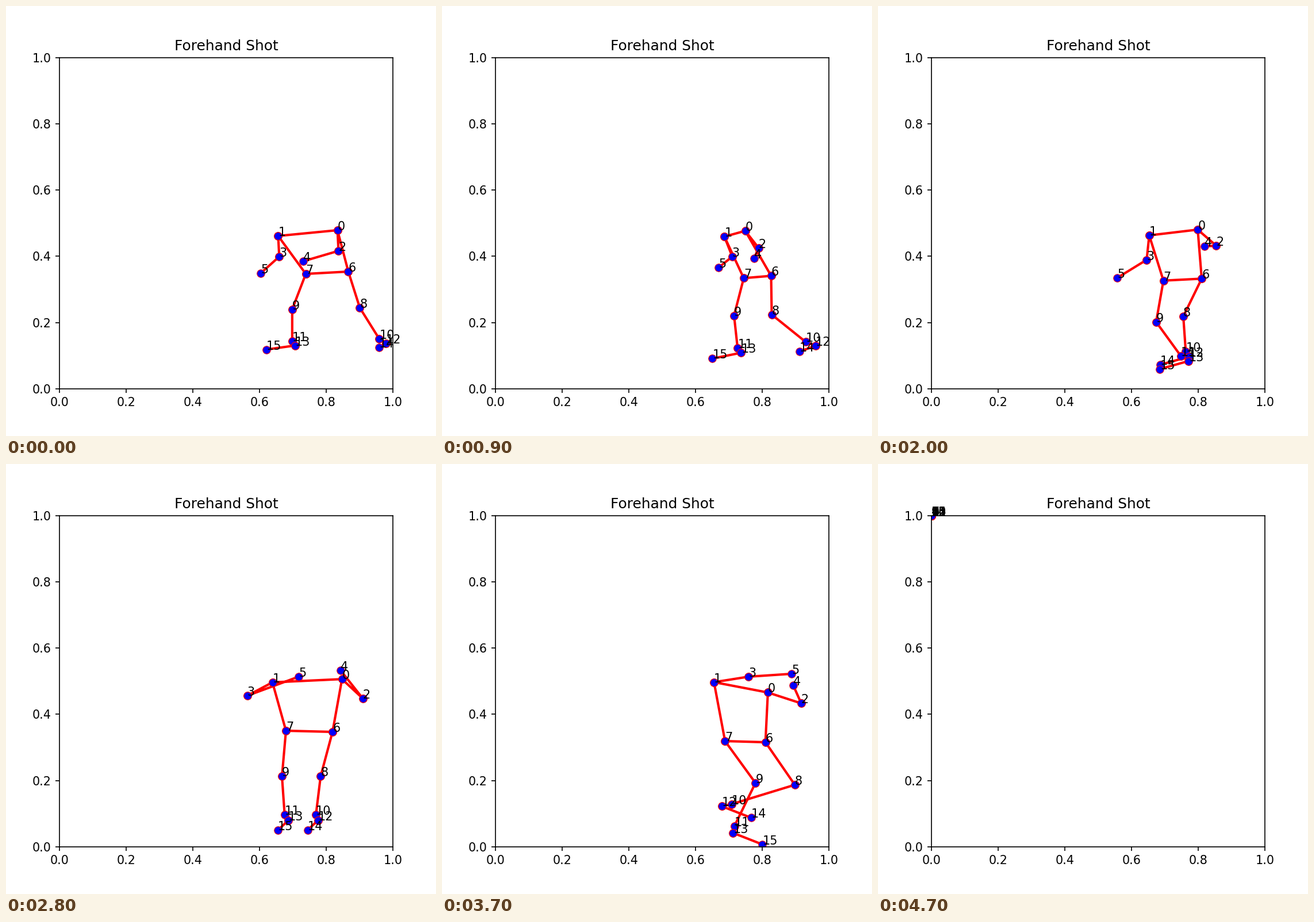
Animation of 748 by 748 pixels, one loop 6.1 s. Source, as a matplotlib script:

```python
import numpy as np
import matplotlib.pyplot as plt
from matplotlib.animation import FuncAnimation

STAGE = 748
STEP_MS = 100
FRAMES = 61
LOST = 47  # from here on the tracker reports every joint at the top left corner

BONES = [(0, 1), (0, 2), (2, 4), (1, 3), (3, 5), (0, 6), (1, 7), (6, 7),
         (6, 8), (8, 10), (10, 12), (12, 14), (7, 9), (9, 11), (11, 13), (13, 15)]
KEY_TIMES = np.array([0, 5, 14, 20, 28, 37, 46])
t = np.arange(LOST)


def curve(*values):
    """Smooth cubic through one value per key time."""
    v = np.array(values)
    slope = np.gradient(v, KEY_TIMES)
    i = np.clip(np.searchsorted(KEY_TIMES, t, side="right") - 1, 0, len(v) - 2)
    span = np.diff(KEY_TIMES)[i]
    u = (t - KEY_TIMES[i]) / span
    return ((1 + 2 * u) * (1 - u) ** 2 * v[i] + u * (1 - u) ** 2 * span * slope[i]
            + u * u * (3 - 2 * u) * v[i + 1] + u * u * (u - 1) * span * slope[i + 1])


def ease(start, end):
    u = np.clip((t - start) / (end - start), 0, 1)
    return u * u * (3 - 2 * u)


def limb(length, degrees):
    """Bone vector, with the angle measured from straight down towards the right."""
    a = np.radians(degrees)
    return length * (np.sin(a) + 1j * np.cos(a))


# The player comes closer to the camera and turns the trunk towards it.
zoom = 1 + 0.364 * (np.minimum(t, 37) / 37) ** 2
turn = curve(0.81, 0.39, 0, 0.61, 1, 0.71, 0.7)
toe_reach = -50 + 102 * ease(22, 38)
early_step = 38 * (1 - ease(5, 14))


def leg(hip, thigh_angle, shin_angle, reach):
    """Knee, ankle, heel and toe; a shin seen from the side looks longer."""
    knee = hip + limb(66 * zoom, thigh_angle)
    shin = limb(zoom * (55 + 32 * np.sin(np.radians(shin_angle)) ** 2), shin_angle)
    ankle = knee + shin
    heel = ankle + 0.2 * shin + 5 - 3j
    return knee, ankle, heel, heel + reach + 1j * (7 + 0.35 * t)


def skeleton_points():
    """All joints over time as x + iy in stage pixels, y pointing down."""
    chest = (curve(525, 520, 500, 514, 524, 520, 544)
             + 1j * curve(395, 397.5, 393.5, 394, 377, 388.5, 393))
    pelvis = (558.5 - 31 * ease(0, 24) + 20 * ease(37, 46)
              + 1j * curve(464, 470, 472, 476, 465, 483, 486))
    shoulder = 13.5 + 47 * turn + 1j * (-5 + 14 * ease(25, 37))
    hip = 22 + 18.5 * turn + 1j * (-2 + 3 * ease(18, 28))

    upper_arm = 36 * zoom ** 1.7
    elbow_r = chest + shoulder + limb(upper_arm, curve(3, 20, 55, 49, 47, 72, 70))
    elbow_l = chest - shoulder + limb(upper_arm, curve(3, 0, 41, -6, -62, 99, 85))
    hand_r = curve(517 + 444j, 521 + 450j, 571 + 421j, 568 + 418j,
                   582 + 359j, 611 + 385j, 628 + 398j)
    hand_l = curve(443 + 465j, 437 + 475j, 520 + 433j, 416 + 473j,
                   509 + 370j, 608 + 365j, 632 + 386j)

    leg_r = leg(pelvis + hip, curve(17.6, 20.6, -27, -26, -15, 34.6, 22),
                curve(32, 43, 48, 4, -7, -73, -60), toe_reach + early_step)
    leg_l = leg(pelvis - hip, curve(-21, -17, -12, -10, -5, 36, 36),
                curve(0, 2, 16, 36, 4, -26, -30), toe_reach)

    joints = [chest + shoulder, chest - shoulder, elbow_r, elbow_l, hand_r, hand_l,
              pelvis + hip, pelvis - hip]
    for pair in zip(leg_r, leg_l):
        joints.extend(pair)
    return np.stack(joints, axis=1)


fig, ax = plt.subplots(figsize=(5, 5), dpi=STAGE / 5)
fig.subplots_adjust(left=0.1245, right=0.9, bottom=0.11, top=0.88)
ax.set(xlim=(0, 1), ylim=(0, 1), title="Forehand Shot")

box = ax.get_position()
pixels = skeleton_points()
points = np.stack([(pixels.real / STAGE - box.x0) / box.width,
                   (1 - pixels.imag / STAGE - box.y0) / box.height], axis=-1)
points = np.maximum(points, 0)

skeleton, = ax.plot([], [], "ro-", lw=2, markersize=6.5,
                    markerfacecolor="blue", markeredgewidth=0.5)
labels = [ax.text(0, 1, str(j), fontsize=10) for j in range(16)]


def draw(frame):
    joints = points[frame] if frame < LOST else np.tile([0.0, 1.0], (16, 1))
    gap = [np.nan, np.nan]
    path = np.array([p for a, b in BONES for p in (joints[a], joints[b], gap)])
    skeleton.set_data(path[:, 0], path[:, 1])
    for label, joint in zip(labels, joints):
        label.set_position(joint)
    return [skeleton, *labels]


animation = FuncAnimation(fig, draw, frames=FRAMES, interval=STEP_MS,
                          repeat=True, repeat_delay=0)
plt.show()
```
